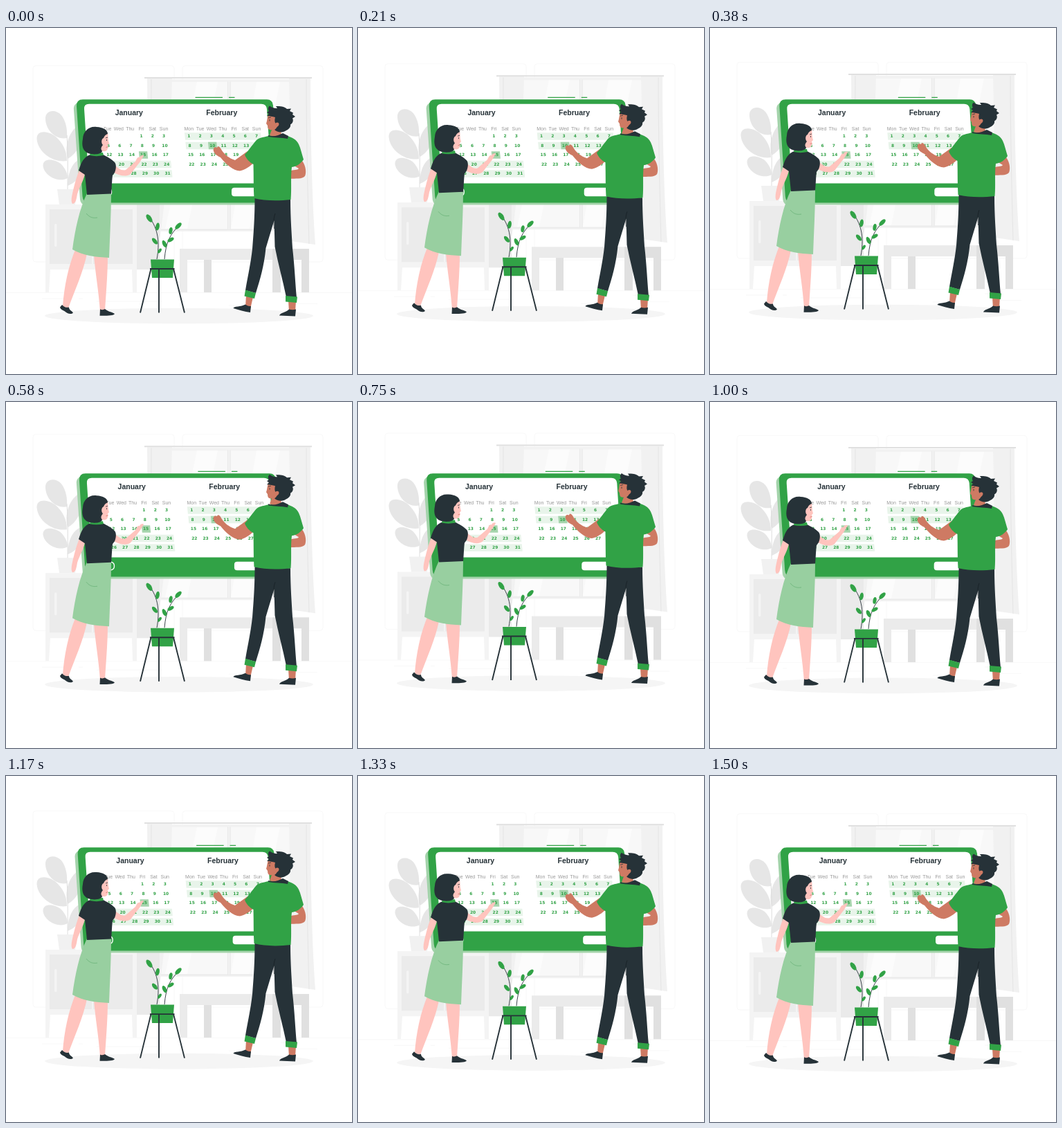
Animation of 500x500 px, one loop 1.54 s. Source, as an HTML page:

```html
<!DOCTYPE html>
<html lang="en">
<head>
<meta charset="utf-8">
<title>Planning calendar</title>
<style>
  html, body { margin: 0; height: 100%; overflow: hidden; background: #fff; }
  svg { display: block; width: 100vw; height: 100vh; }
  text { font-family: "Liberation Sans", Arial, sans-serif; text-anchor: middle; }
  .title { font-size: 10.5px; font-weight: bold; fill: #263238; }
  .head { font-size: 7px; fill: #999; }
  .date { font: bold 5.9px "DejaVu Sans", sans-serif; fill: #31a246; }
  .green { fill: #31a246; }
  .dark { fill: #263238; }
  .pink { fill: #ffc4be; }
  .brown { fill: #ce7a63; }
  .line { fill: none; stroke: #263238; }
</style>
</head>
<body>
<svg viewBox="0 0 500 500">
  <g class="float">
    <g fill="none" stroke="#ebebeb" stroke-width=".35">
      <rect x="39" y="54.5" width="204" height="283.5" rx="4"/>
      <rect x="255" y="54.5" width="203" height="283.5" rx="4"/>
      <path d="M0 382.5H500M417 398.5h33M322 401h9M397 389h19M52 391h43M105 391h6M131 395h94"/>
    </g>

    <!-- window and curtains -->
    <path d="M210 74H435V294H210Z" fill="#f2f2f2"/>
    <path d="M224 78H320V290H224ZM325 78H430V290H325Z" fill="#f8f8f8"/>
    <path d="M276 78H306L262 290H230ZM362 78H396L352 290H325Z" fill="#fcfcfc"/>
    <path d="M320.5 77V291M324 77V291M222 291.5H432" stroke="#e9e9e9" fill="none"/>
    <path d="M204 73H240C238 150 232 240 222 306L197 312C202 240 205 150 204 73Z" fill="#f1f1f1"/>
    <path d="M440 73H409C411 150 412 240 405 307L447 313C442 240 440 150 440 73Z" fill="#f1f1f1"/>
    <path d="M434 74C434 150 436 240 438 312M210 74C210 150 207 240 204 310" stroke="#e5e5e5" fill="none"/>
    <path d="M200 72H442" stroke="#e0e0e0" stroke-width="2"/>

    <!-- bench -->
    <path d="M251 319H385V335H297V382H286V335H262V382H251Z" fill="#ebebeb"/>
    <path d="M385 319H438V382H427V335H397V382H385ZM286 335H297V382H286Z" fill="#e0e0e0"/>

    <!-- cabinet -->
    <path d="M189 255H222V349H189Z" fill="#eaeaea"/>
    <path d="M57 255H189V382H183L182 349H64L62 382H57Z" fill="#f4f4f4"/>
    <path d="M63 262H183V341H63Z" fill="#ebebeb"/>
    <path d="M125 262V341" stroke="#f4f4f4" stroke-width="2"/>
    <rect x="70" y="283" width="3.5" height="33" rx="1.7" fill="#f4f4f4"/>

    <!-- house plant -->
    <g fill="#e6e6e6">
      <path d="M88 159C73 162 58 149 57 132C56 119 71 116 80 126C87 135 89 148 88 159Z"/>
      <path d="M88 192C68 195 46 180 44.500 160C44 146 64 148 75 160C85 171 88 181 88 192Z"/>
      <path d="M89 217C76 224 55 214 53.500 199C53 187 71 189 80 197C86 204 89 210 89 217Z"/>
      <path d="M89 189C84 170 91 147 109 138C114 152 108 179 89 189Z"/>
      <path d="M89 228C89 206 98 190 112 188C115 204 107 221 89 228Z"/>
    </g>
    <path d="M88 155C90 185 89 210 89 235" fill="none" stroke="#dedede"/>
    <path d="M74 233H103L100 255H77Z" fill="#f1f1f1"/>

    <ellipse cx="250" cy="416" rx="194" ry="11.3" fill="#f5f5f5"/>
  </g>

  <g id="calendar">
    <path d="M109 107Q97 108 98 118L107 248Q108 255.500 115 255.500H385V107Z" fill="#a3d3aa"/>
    <path class="green" d="M111 103.300H377Q385 103.300 386 112L396 243Q397 252.500 388 252.500H120Q111 252.500 110.500 243L102 113Q101.500 103.300 111 103.300Z"/>
    <path d="M120 109.700H369Q376 109.700 377 117L384 224.500H120L113 117Q112.500 109.700 120 109.700Z" fill="#fff"/>
    <rect x="326" y="230.700" width="54" height="12.500" rx="4" fill="#fff"/>
    <rect x="121" y="231.200" width="31.500" height="11.500" rx="5" fill="none" stroke="#fff" stroke-width="1.400"/>
    <path d="M273.500 100.300H313M322 100.300H330.500" stroke="#31a246" stroke-width="1.200"/>
  </g>

  <g class="float">
    <!-- potted plant on a stand -->
    <path class="line" stroke-width=".9" d="M218 334C222 312 221 291 206 272M229 334C231 310 237 297 252 284"/>
    <g class="green" id="leaves"></g>
    <path class="green" d="M209 334.500H243L241 361H211Z"/>
    <path class="line" stroke-width="1.900" d="M208 348H243.500M209.500 348L194 411.500M221 348V411.500M242 348L258 411.500"/>

    <!-- woman -->
    <path class="pink" d="M101 318L117 326C112 352 99 380 90 405L82 402C84 374 90 344 101 318ZM127 328H147C147 360 144 388 143 410H136C134 380 129 354 127 328Z"/>
    <path class="dark" d="M81 400C84 403.500 88 404.500 91 403.500C91 407.500 95 408.500 97 411.500C94 414.500 88 412.500 85 409.500C82 407.500 79 407 78 403.500ZM136 406.300C139 408 141 407 143 406C147 410 153 410 157 413C156 416 144 415.700 135.500 415.700Z"/>
    <path class="pink" d="M107 203C102 214 98 230 96 239C94 247 94 254 97 254C101 253 102 246 103 240C106 230 112 221 114 211Z"/>
    <path class="pink" d="M156 197C162 203 168 207 173 205L187 193C189 189 190 186 193 187C194 184 198 183 199 184.500C198 187 196 189 194 193L180 211C173 216 163 213 154 208Z"/>
    <path d="M117 239H152C152 270 150 300 149 332C130 331 111 329 96 320C100 290 106 262 117 239Z" fill="#98cfa0"/>
    <path d="M116 268C121 274 126 275 132 274" fill="none" stroke="#74b981"/>
    <path class="dark" d="M122 183C113 186 109 193 105 206L114 212L117 241L152 239.500C153 230 153 220 154 213L157 209C160 202 159 196 157 194C151 188 146 186 140 183Z"/>
    <path class="green" d="M122 180H140L141 184C134 185.500 127 185.500 121 184Z"/>
    <path class="pink" d="M134 152H147C148 157 147 161 149 167L147 169C148 175 146 179 140 178L132 181Z"/>
    <path class="dark" d="M131 143C119 141.500 111.500 150 111 160C109 170 111 178 119 181C128 184 138 182 139 178C136 174 138 172 140 169C137 166 138 160 141 159C142 156 144 154 147 153C147 147 140 143.500 131 143Z"/>
    <path class="line" stroke-width=".8" d="M144 159L147 158M145.500 161V163"/>
    <path d="M144.500 172.500L147.500 171.500" stroke="#d96f68" stroke-width=".8"/>

    <!-- man -->
    <path class="brown" d="M347 386L357 389L353 406L346 403ZM408 394H419L418 410H409Z"/>
    <path class="dark" d="M346 399.500C349 402 352 402 354 402L353 411C345 410 336 407 328.500 405C329 402 340 403 346 399.500ZM409 406.500C412 407.500 416 407.500 419 406.500L418 416.500L395 415.500C396 411.500 405 411 409 406.500Z"/>
    <path class="dark" d="M359.500 246L411 248C411 275 413 300 414 318C417 344 418 368 420 390L405 389C400 364 393 340 388.500 316L387.500 278L375.500 318C373 344 367 364 361 383L346 379C350 356 354 338 356 319C358 294 359.500 272 359.500 246Z"/>
    <path d="M389 268C386 276 387 284 387.500 290" fill="none" stroke="#151d21" stroke-width=".7"/>
    <path class="green" d="M346 378.500L361 383L359 391L344.500 387.500ZM404 387L421 388.500L420 397L404 395.500Z"/>
    <path class="brown" d="M349 178L331 191C322 188 316 183 312 177C309 171 306 169 305 173C301 171 299 174 300 178C302 183 306 185 310 187C318 197 328 206 338 206.500C346 205 352 200 358 195Z"/>
    <path class="brown" d="M412 197L428 192C434 200 434 210 432 214C428 219 418 217 410 218V207C416 204 421 206 423 203L418 200Z"/>
    <path class="green" d="M379 156C371 158 364 159 361 163C355 170 350 178 345 183C347 189 352 194 357.500 197C358 214 357.500 231 358.500 246C374 250 394 250 411.500 248C413 231 411 216 413 201C420 200 426 196 430 190C427 181 426 174 423 168C419 160 414 159 407 156Z"/>
    <path class="brown" d="M382 121H394L398 155C392 158 386 157 381 155L384 147C380 148 378 146 378 141L376 138C378 133 377 126 382 121Z"/>
    <path class="dark" d="M379 155C386 158 394 155 400 152L408 156L407 160C398 158 388 159 379 157Z"/>
    <path class="dark" d="M377 122L380 120C378 117 379 114 381 112.500C384 115 388 116.500 392 116L390 113C396 113 402 113 406 117L412 116.500L410 120L415 122.500L414 125L418 128L414 130.500C416 134 414 138 411 139.500C412 143 408 147 405 148C399 152 392 151 388 147C391 145 394 141 391 138C388 138 388 133 389 129C385 128 381 127 377 127L380 124Z"/>
    <path class="brown" d="M390 137C394 135 396 139 393 142C391 144 389 143 389 141Z"/>
    <path class="line" stroke-width=".8" d="M379 130L383 129M381 132V134.500"/>
  </g>
</svg>

<script>
const calendar = document.getElementById('calendar');
const leaves = document.getElementById('leaves');
const floating = document.querySelectorAll('.float');

function add(parent, tag, attrs, text = '') {
  const node = document.createElementNS('http://www.w3.org/2000/svg', tag);
  for (const key in attrs) node.setAttribute(key, attrs[key]);
  node.textContent = text;
  parent.append(node);
}

const label = (cls, x, y, text) => add(calendar, 'text', { class: cls, x, y }, text);

// Rows lean to the right a little, like the board itself.
function drawMonth({ name, left, first, days, bands, picked }) {
  const x = (col, row) => left + col * 16.3 + row * 1.35;
  const cell = (col, row, cols, fill) => {
    const a = x(col, row) - 6, b = a + cols * 16.3 - 4, y = 151.2 + row * 13.5;
    add(calendar, 'path', { fill, d: `M${a} ${y}H${b}l1 10.6H${a + 1}Z` });
  };
  label('title', left + 47.8, 126.2, name);
  'Mon Tue Wed Thu Fri Sat Sun'.split(' ')
    .forEach((day, col) => label('head', left + .3 + col * 16.3, 147.8, day));
  bands.forEach(row => cell(0, row, 7, '#e8f4ea'));
  const spot = first + picked - 1;
  cell(spot % 7, Math.floor(spot / 7), 1, '#a6d5ad');
  for (let day = 1; day <= days; day++) {
    const slot = first + day - 1, row = Math.floor(slot / 7);
    label('date', x(slot % 7, row) + .3, 158.4 + row * 13.5, day);
  }
}

drawMonth({ name: 'January', left: 130, first: 4, days: 31, bands: [3, 4], picked: 15 });
drawMonth({ name: 'February', left: 264, first: 0, days: 28, bands: [0, 1], picked: 10 });

// x, y, length, angle
[[207, 275, 13, 55], [219, 287, 11, 100], [215, 308, 11, 50], [222, 322, 8, 125],
 [249, 286, 12, 135], [238, 293, 10, 100], [238, 306, 10, 150], [229, 312, 11, 65]]
  .forEach(([x, y, size, turn]) => add(leaves, 'ellipse', {
    rx: size / 2, ry: size / 4, transform: `translate(${x} ${y}) rotate(${turn})`
  }));

const FRAME = 1000 / 24, LOOP = 1540, CYCLE = 1500;
const shake = [0, -1, 2, -4, 4, -4, 4, -4, 2, -1, 0];

function draw(now) {
  const frame = Math.floor((now % LOOP + 4.9) / FRAME);
  const phase = (frame + .5) * FRAME % CYCLE / CYCLE;
  const lift = 10 * (1 - Math.abs(2 * phase - 1));
  const i = Math.floor(phase * 10), part = phase * 10 - i;
  const shift = shake[i] + (shake[i + 1] - shake[i]) * part;
  floating.forEach(g => g.setAttribute('transform', `translate(0 ${.28 - lift})`));
  calendar.setAttribute('transform', `translate(${shift + .14} 0)`);
}

const start = performance.now();
function tick() {
  draw(performance.now() - start);
  requestAnimationFrame(tick);
}
tick();
</script>
</body>
</html>
```
